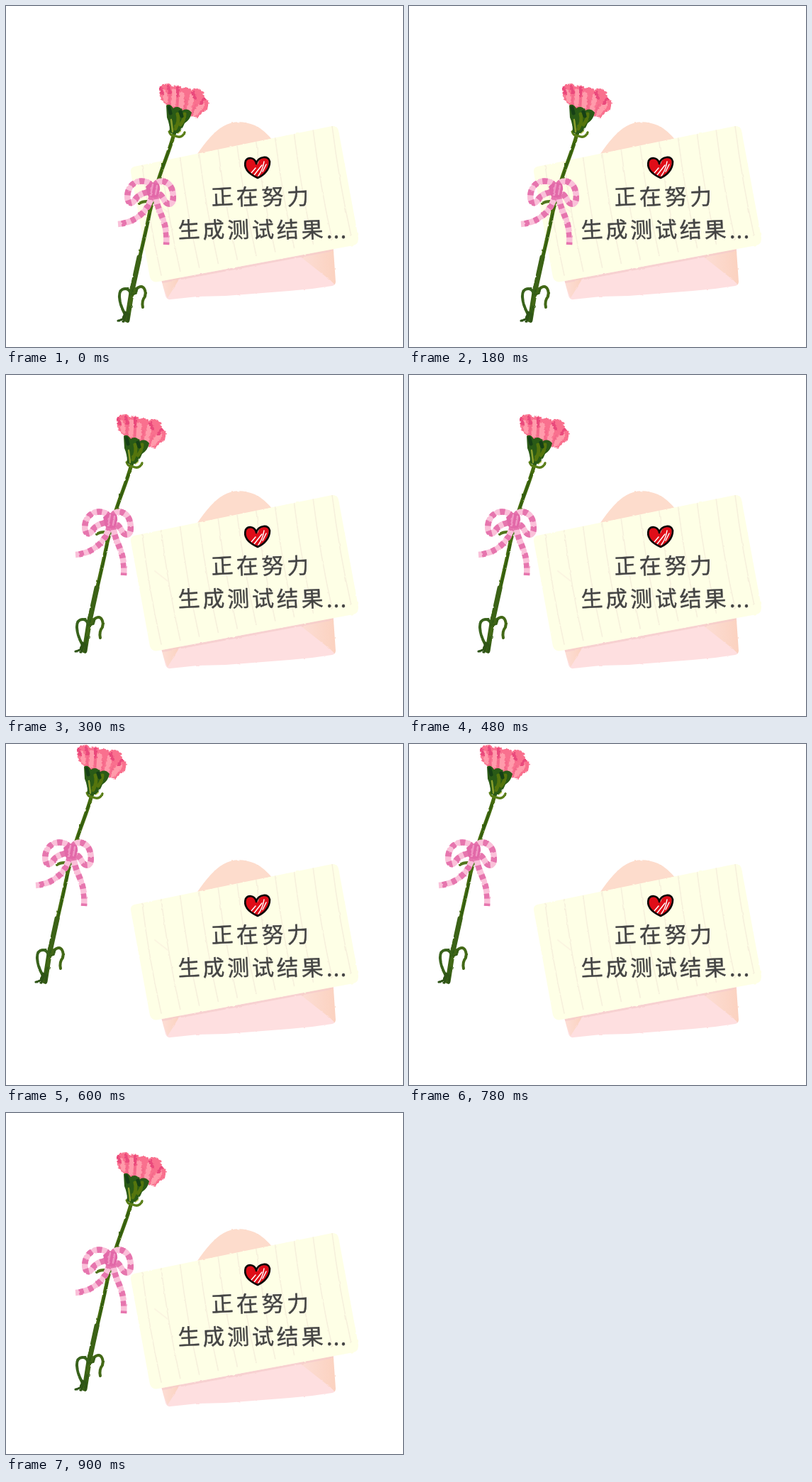
Animation, 560 px wide and 480 px high, one loop 1.2 s. Source, as an HTML page:

```html
<!DOCTYPE html>
<html lang="zh-CN">
<head>
<meta charset="utf-8">
<title>正在生成</title>
<style>
  html, body { margin: 0; width: 100%; height: 100%; overflow: hidden; background: #fff; }
  svg { display: block; width: 560px; height: 480px; }
  path { stroke-linecap: round; stroke-linejoin: round; }
  .line { fill: none; }
  .ribbon path { fill: none; stroke-linecap: butt; stroke-width: 8.5; }
  .base { stroke: #fac0d9; }
  .stripes { stroke: #e674ae; stroke-dasharray: 7 7; }
  .label {
    font: 400 31px "Noto Sans CJK SC", "Noto Sans CJK", sans-serif;
    fill: #444; stroke: #444; stroke-width: .4; stroke-linejoin: round;
  }
  .flower { animation: drift 1200ms step-end infinite; }
  @keyframes drift {
    0%, 100% { transform: translate(0, 0); }
    25%, 75% { transform: translate(-60px, -54px); }
    50% { transform: translate(-116px, -108px); }
  }
</style>
</head>
<body>
<svg viewBox="0 0 560 480">
  <defs>
    <linearGradient id="fold">
      <stop offset="0" stop-color="#fde0da"/>
      <stop offset="1" stop-color="#fbd1be"/>
    </linearGradient>
    <filter id="rough" x="-10%" y="-10%" width="120%" height="120%">
      <feTurbulence type="fractalNoise" baseFrequency=".25" numOctaves="2" seed="4"/>
      <feDisplacementMap in="SourceGraphic" scale="4.5" xChannelSelector="R" yChannelSelector="G"/>
    </filter>
    <filter id="soft" x="-5%" y="-5%" width="110%" height="110%">
      <feTurbulence type="fractalNoise" baseFrequency=".12" numOctaves="2" seed="9"/>
      <feDisplacementMap in="SourceGraphic" scale="2.2" xChannelSelector="R" yChannelSelector="G"/>
    </filter>
    <clipPath id="paper">
      <path d="M181 226 L460 169 Q467 168 469 175 L497 326 Q498 335 490 337 L215 388 Q206 390 203 382 L176 234 Q175 228 181 226Z"/>
    </clipPath>
    <clipPath id="pocket">
      <path d="M215 370 L461 330 465 388 Q465 393 460 394 Q430 399 400 401 L310 408 270 409 232 413 Q227 414 225 408Z"/>
    </clipPath>
  </defs>

  <!-- Envelope -->
  <g filter="url(#soft)">
    <path d="M268 211 Q290 178 307 169 Q326 158 351 168 Q364 174 377 190 L376 215 268 225Z" fill="#fddccc"/>
    <g clip-path="url(#pocket)">
      <path d="M210 340H470V420H210Z" fill="#fedfe0"/>
      <path d="M215 380 L247 380 228 411Z" fill="url(#fold)"/>
      <path d="M405 345 L468 330 V398 L460 388 418 355Z" fill="url(#fold)"/>
      <path class="line" d="M213 390 L465 343" stroke="#f5cccb" stroke-width="3" opacity=".7"/>
    </g>
  </g>

  <!-- Card -->
  <g filter="url(#soft)">
    <g clip-path="url(#paper)">
      <path d="M170 160H500V395H170Z" fill="#feffe6"/>
      <g id="rules" class="line" stroke="#f6f0dc" stroke-width="1.6"></g>
      <path class="line" d="M210 276 L228 290" stroke="#fbf5e1" stroke-width="2"/>
    </g>
  </g>

  <!-- Heart -->
  <path d="M355 223 C351 211 340 211 338 220 C336 231 346 238 355 241 C364 237 371 230 371 219 C370 210 357 211 355 223Z" fill="#df0d18"/>
  <path class="line" d="M346 235 L352 228 M350 238 L361 224 M356 239 Q362 231 364 219 M362 233 L367 223" stroke="#fff" stroke-width="1.5"/>
  <path class="line" d="M353 221 C350 212 341 213 338 218 C334 231 346 238 355 242 C364 238 372 230 372 219 C371 210 356 211 353 222" stroke="#0b0505" stroke-width="2.7"/>

  <g class="label">
    <text x="290" y="280.5" letter-spacing="4.6" rotate="-3">正在努力</text>
    <text x="243" y="327" letter-spacing="3.8" rotate="-3">生成测试结果<tspan letter-spacing="1.3">...</tspan></text>
  </g>

  <g class="flower">
    <!-- Stem and leaves -->
    <g filter="url(#soft)" class="line">
      <path d="M237 180 C229 210 216 235 209 266 L203 289 C196 325 183 376 177 404 L171 441" stroke="#446c10" stroke-width="5.2"/>
      <path d="M188 354 L177 404 171 442" stroke="#3a6214" stroke-width="7.2"/>
      <path d="M233 193 L217 240 M203 293 L190 350 M179 398 L171 440" stroke="#2f5a12" stroke-width="1.8"/>
      <path d="M199 275 Q192 275 188 278" stroke="#51751a" stroke-width="4"/>
      <path d="M177 411 C176 397 169 397 164 399 C156 403 161 424 170 437" stroke="#39621a" stroke-width="4"/>
      <path d="M175 420 Q179 400 187 396 C195 392 198 402 196 409 Q191 415 193 424" stroke="#426817" stroke-width="4"/>
      <path d="M176 406 Q184 407 185 398" stroke="#355d14" stroke-width="3"/>
      <path d="M158 443 Q166 443 168 431 M170 432 L166 444 M173 434 L172 444" stroke="#2d5317" stroke-width="3.2"/>
      <path d="M237 183 Q231 182 230 176 M239 183 Q248 187 252 178" stroke="#597d17" stroke-width="3.2"/>
      <path d="M242 179 L246 176" stroke="#c2cd62" stroke-width="2.5"/>
    </g>

    <!-- Bow -->
    <g class="ribbon" filter="url(#soft)" id="bow"></g>
    <g filter="url(#soft)">
      <path d="M197 254 Q206 246 216 251 Q219 259 214 269 Q206 271 200 267Z" fill="#e268a8"/>
      <path class="line" d="M207 251 L204 266 M213 253 L211 265" stroke="#f095c3" stroke-width="2.5"/>
    </g>

    <!-- Bloom -->
    <g filter="url(#rough)">
      <path d="M216 116 L222 110 230 109 235 113 242 111 248 116 255 114 261 118 270 116 278 121 280 129 287 136 284 145 277 150 271 157 259 154 243 149 227 141 219 132Z" fill="#f9708e"/>
      <path class="line" d="M226 133 L223 121 M236 138 L237 120 M247 142 L248 124 M258 147 L262 128 M267 151 L277 138" stroke="#ff9bab" stroke-width="7"/>
      <path class="line" d="M218 116 L221 124 M229 113 L231 122 M242 115 L242 126 M264 122 L267 130 M279 131 L275 137" stroke="#ea487b" stroke-width="4"/>
      <path class="line" d="M231 139 L231 126 M242 143 L242 130 M252 147 L254 132 M263 152 L268 138" stroke="#f4688b" stroke-width="2"/>
    </g>
    <g filter="url(#soft)">
      <path d="M226 140 Q231 136 236 144 Q243 139 249 147 Q256 143 262 150 Q260 160 252 165 Q248 176 239 181 L231 178 Q231 166 227 157Z" fill="#2b5a13"/>
      <path class="line" d="M242 152 Q245 161 239 173 M252 152 Q252 160 246 167" stroke="#54750f" stroke-width="5"/>
      <path class="line" d="M230 143 L232 151 M246 149 L248 155" stroke="#123f13" stroke-width="5"/>
      <path class="line" d="M233 160 L235 176" stroke="#8ba02d" stroke-width="2.5"/>
    </g>
  </g>
</svg>
<script>
  const add = (parent, attrs) => {
    const path = document.createElementNS("http://www.w3.org/2000/svg", "path");
    for (const name in attrs) path.setAttribute(name, attrs[name]);
    parent.append(path);
  };

  // Ruled lines run parallel to the card's left edge.
  const rules = document.getElementById("rules");
  for (let i = 0; i < 11; i++) {
    const x = 192 + i * 26.8, y = 224 - i * 5.5;
    add(rules, { d: `M${x} ${y} q10 80 27 155` });
  }

  const bow = document.getElementById("bow");
  const strips = [
    "M206 266 C201 289 183 305 158 307",
    "M211 265 C212 290 229 300 226 336",
    "M207 254 C199 243 177 243 172 262 C169 276 176 281 181 274 Q188 262 207 261",
    "M210 254 C212 243 231 243 235 261 C239 280 229 283 223 273 Q219 264 210 261"
  ];
  for (const d of strips) {
    add(bow, { d, class: "base" });
    add(bow, { d, class: "stripes" });
  }
</script>
</body>
</html>
```
